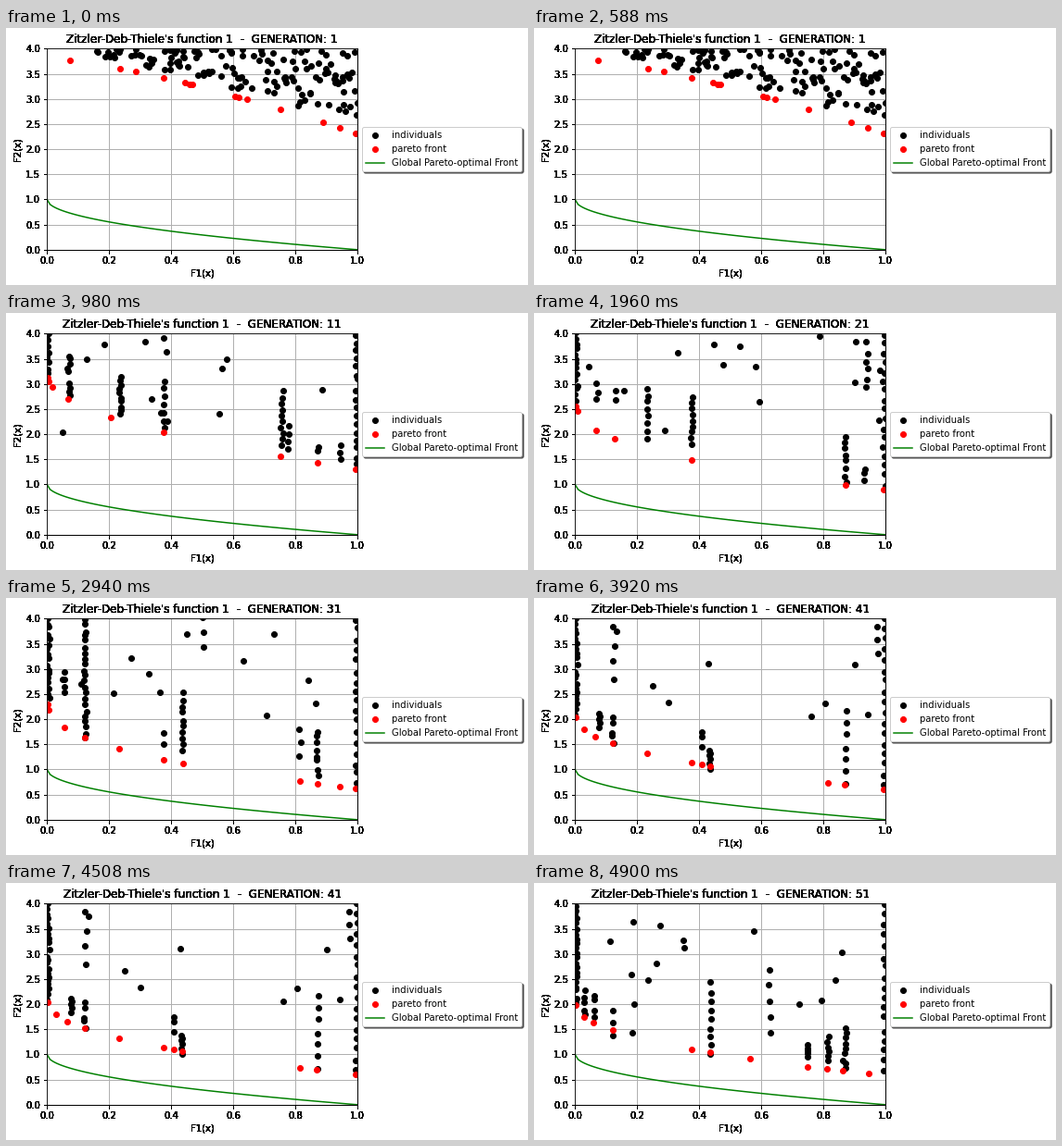
Write a matplotlib script that moves like this. It is 563 px wide and 278 px high and loops after 5880 ms.

```python
import numpy as np
import matplotlib.pyplot as plt
from matplotlib.animation import FuncAnimation

W, H, DPI = 563, 278, 72
LAYERS = 12  # stacked axes give the heavy lettering
RECT = [44.2 / W, 38.2 / H, 334.8 / W, 217.44 / H]
rng = np.random.default_rng(11)


def make_front(start, end, power, xs):
    """Pareto points on a curve falling from start to end."""
    xs = np.array(xs)
    return xs, start - (start - end) * xs ** power


def stack(x, low, high, n):
    """A column of n individuals sharing nearly the same F1."""
    return (x + rng.normal(0, .002, n),
            np.linspace(low, high, n) + rng.normal(0, .02, n))


def cloud(start, end, power, n):
    """First population: dense to the right, all above the front."""
    xs = rng.uniform(0, 1, n) ** .45
    floor = start - (start - end) * xs ** power + .15
    return xs, 4 - (4 - floor) * rng.uniform(0, 1, n) ** 1.2


def evolved(start, end, power, lead, stacks, strays):
    """Later population: columns, crowded edges and a few strays."""
    left = stack(.003, start, 4, int(11 * (4 - start)))
    right = stack(.996, end + .1, 4, 17)
    xs = rng.uniform(0, 1, strays)
    high = rng.uniform(2, 4, strays)
    parts = [left, right, (xs, high)] + [stack(*s) for s in stacks]
    return np.hstack(parts), make_front(start, end, power, lead)


first = 3.8, 2.3, 1.4
generations = [
    (cloud(*first, 135),
     make_front(*first, [.075, .236, .287, .376, .445, .46, .469, .606, .618,
                         .645, .752, .89, .943, .994, .997])),
    evolved(3.2, 1.3, .5,
            [.002, .006, .018, .069, .206, .376, .752, .872, .994],
            [(.072, 2.78, 3.02, 4), (.072, 3.29, 3.6, 4),
             (.236, 2.4, 3.15, 10), (.376, 2.12, 3.07, 7),
             (.757, 1.78, 2.85, 10), (.776, 1.69, 2.17, 4),
             (.872, 1.67, 1.78, 2), (.946, 1.53, 1.77, 3)], 15),
    evolved(2.7, .9, .4,
            [.002, .007, .069, .128, .376, .872, .994],
            [(.07, 2.7, 3, 3), (.128, 2.66, 2.9, 2), (.233, 1.93, 2.92, 8),
             (.376, 1.8, 2.74, 9), (.872, 1.05, 1.97, 8),
             (.932, 1.1, 1.3, 3), (.94, 2.94, 3.84, 6)], 14),
    evolved(2.4, .62, .4,
            [.001, .005, .057, .122, .233, .376, .439, .815, .872, .943, .994],
            [(.057, 2.5, 2.94, 4), (.122, 1.6, 4, 22), (.376, 1.53, 1.71, 2),
             (.438, 1.37, 2.5, 10), (.503, 3.46, 4, 3),
             (.815, 1.28, 1.8, 3), (.872, .9, 1.77, 8)], 12),
    evolved(2.1, .6, .45,
            [.001, .03, .066, .122, .233, .376, .409, .436, .815, .87, .994],
            [(.079, 1.86, 2.1, 5), (.122, 1.5, 2, 5), (.122, 2.81, 3.83, 4),
             (.409, 1.47, 1.77, 3), (.435, 1.06, 1.42, 6),
             (.873, .73, 2.17, 7), (.972, 3.28, 3.87, 3)], 9),
    evolved(2.05, .58, .45,
            [.001, .03, .06, .122, .376, .436, .565, .75, .812, .863, .946],
            [(.03, 1.8, 2.25, 5), (.062, 1.75, 2.2, 4), (.122, 1.37, 1.85, 3),
             (.185, 1.42, 2.6, 3), (.436, 1.02, 2.4, 9),
             (.627, 1.43, 2.68, 5), (.75, .95, 1.2, 5),
             (.815, .87, 1.35, 6), (.87, .7, 1.53, 9)], 12),
]

plt.rcParams["font.family"] = "DejaVu Sans"
fig = plt.figure(figsize=(W / DPI, H / DPI), dpi=DPI, facecolor="white")


def make_axes():
    ax = fig.add_axes(RECT, facecolor="none")
    ax.set(xlim=(0, 1), ylim=(0, 4), xlabel="F1(x)", ylabel="F2(x)")
    ax.set_yticks(np.arange(0, 4.1, .5))
    ax.grid(True)
    return ax


layers = [make_axes() for _ in range(LAYERS)]
top = layers[-1]
titles = [ax.set_title("") for ax in layers]
people, = top.plot([], [], "ko", label="individuals")
front, = top.plot([], [], "ro", label="pareto front")
f1 = np.linspace(0, 1, 100)
top.plot(f1, 1 - np.sqrt(f1), "g", label="Global Pareto-optimal Front")
top.legend(loc="center left", bbox_to_anchor=(1, .5), fancybox=True,
           shadow={"alpha": .9})


def draw(i):
    crowd, best = generations[i]
    people.set_data(*crowd)
    front.set_data(*best)
    for title in titles:
        title.set_text("Zitzler-Deb-Thiele's function 1  -  "
                       f"GENERATION: {10 * i + 1}")
    return [people, front, *titles]


anim = FuncAnimation(fig, draw, frames=len(generations), interval=980,
                     repeat=True, repeat_delay=0)
plt.show()
```
